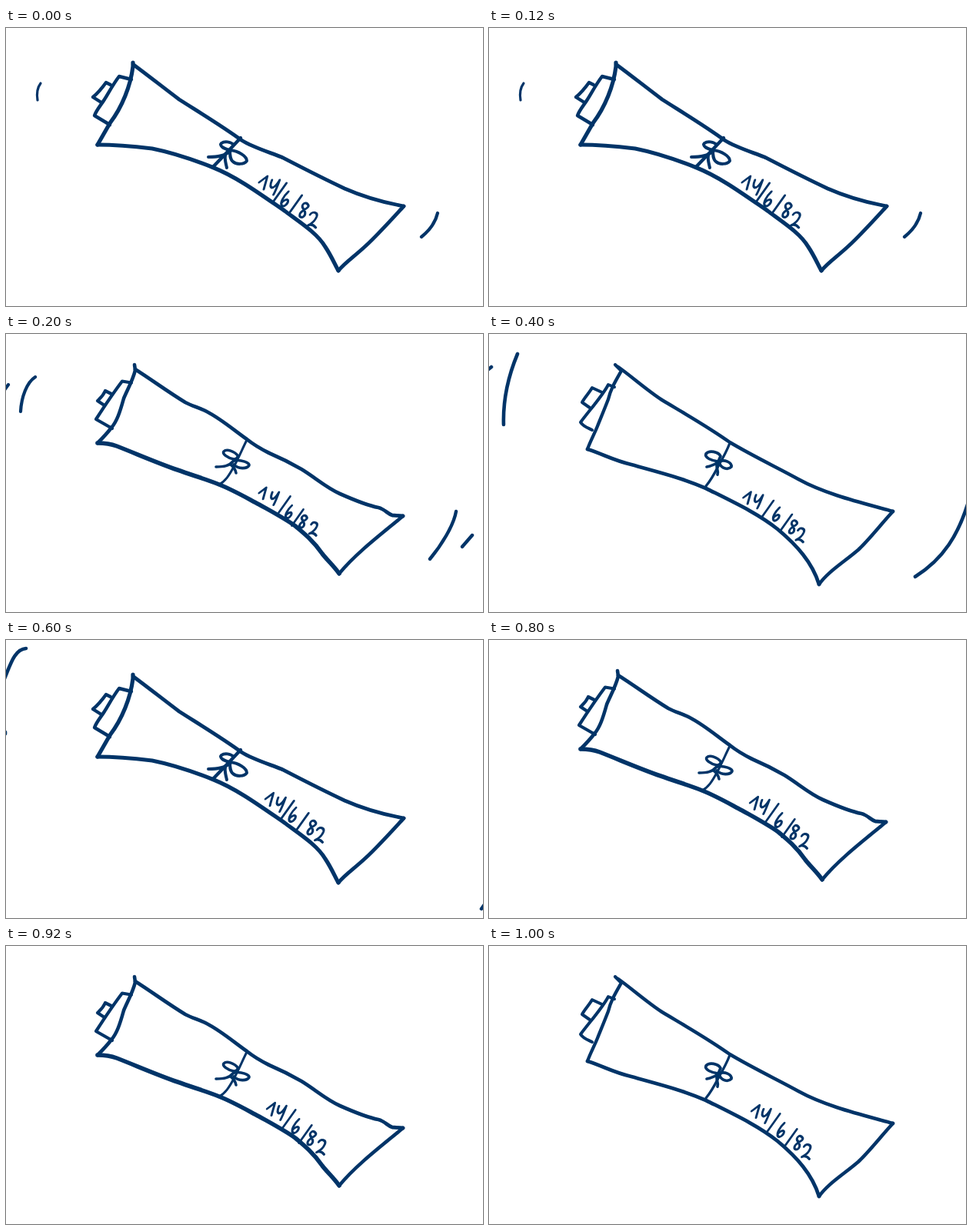
Recreate the animation shown at these times as an HTML page. Size 620 by 362 pixels, loop 1200 ms.

```html
<!DOCTYPE html>
<html lang="en">
<head>
<meta charset="utf-8">
<title>Tied scroll</title>
<style>
  html, body { margin: 0; width: 100%; height: 100%; overflow: hidden; background: #fff; }
  svg { display: block; width: 100vw; height: 100vh; }
  path { fill: none; stroke: #003468; stroke-linecap: round; stroke-linejoin: round; }
</style>
</head>
<body>
<svg id="stage" viewBox="0 0 620 362" role="img" aria-label="A tied scroll dated 14/6/82"></svg>
<script>
const HOLD = 200;
const stage = document.getElementById('stage');

// Three drawings of the scroll; each stroke is [width, path].
const scrolls = [
  [
    [5.2, 'M165 45L165 50C162 75 151 103 135 124L119 152'],
    [4.8, 'M166 48C185 62 205 78 225 93C250 109 280 127 306 146C320 155 340 161 358 168C385 182 410 195 440 209C465 220 495 228 517 232'],
    [4.8, 'M517 232C505 245 480 273 465 286C452 298 440 306 432 316'],
    [5.2, 'M119 152C140 152 165 154 190 157C220 163 245 172 270 182C300 194 330 216 362 238C385 255 405 268 415 285C423 297 427 307 432 316'],
    [4.4, 'M163 67L147 63C140 72 133 85 128 93C123 101 118 106 115 114L135 126'],
    [4.4, 'M136 74L130 71C125 78 119 85 113 90L124 97'],
    [4.4, 'M305 143L291 158L269 181'],
    [4, 'M291 159C282 157 277 153 280 150C284 147 292 148 296 152'],
    [4, 'M291 159C302 160 313 167 313 173C310 178 299 178 295 174C291 171 291 165 291 159'],
    [4, 'M290 161C284 167 275 168 263 168M285 166C284 172 286 177 287 182']
  ],
  [
    [4.6, 'M167 40L168 47C165 60 158 72 153 84C148 102 144 114 137 122C131 130 125 136 119 142'],
    [4.8, 'M168 46C190 60 210 75 233 89C242 94 252 96 261 101C280 111 296 125 313 137C323 145 332 150 342 155C356 161 370 168 384 176C402 187 416 200 434 208C452 216 468 223 484 226C492 228 496 234 502 236L516 237'],
    [4.6, 'M516 237C495 255 458 282 433 312'],
    [5.6, 'M119 142C127 142 136 143 144 146C172 157 197 168 223 177C242 184 260 189 277 196C295 203 312 213 329 222C345 231 362 240 376 250C388 260 400 270 411 286C417 294 427 303 433 312'],
    [4.2, 'M163 63.5L151 61.5C143 72 128 94 117 111L138 123'],
    [4.2, 'M137 78L129 74C126 81 122 84 119 87L128 93'],
    [3, 'M313 138C307 150 302 162 296 173C290 184 285 192 277 196'],
    [3.6, 'M296 163C287 161 281 156 283 153C287 149 297 153 301 158C302 161 299 163 296 163'],
    [3.6, 'M296 165C306 163 317 168 316 171C313 176 302 176 296 170'],
    [3.6, 'M296 165C290 172 283 173 273 173M292 170C296 173 298 176 299 181']
  ],
  [
    [4.3, 'M164 40L172 48C164 62 158 72 155 85C150 98 145 110 141 120C137 130 131 141 128 150'],
    [4.5, 'M168 43C185 55 205 73 225 86C255 104 285 121 313 141C345 160 375 174 402 189C440 210 490 221 525 231'],
    [4.5, 'M525 231C510 247 495 267 480 281C460 298 440 310 429 326'],
    [4.8, 'M128 150C150 157 160 164 185 170C220 180 250 187 282 201C320 220 350 234 375 254C400 275 420 297 429 326'],
    [4, 'M163 69L155 66C148 80 130 100 119 115C122 120 128 122 134 125'],
    [4, 'M147 76L134 70C130 77 124 83 121 89L131 96'],
    [3.3, 'M313 142C308 155 302 165 298 172C292 184 287 192 282 198'],
    [3.7, 'M298 166C289 165 280 161 282 156C286 151 298 153 301 159L298 166'],
    [3.7, 'M299 166C306 163 316 167 315 173C311 177 303 176 299 168'],
    [3.7, 'M298 167C293 170 289 172 283 173M297 168C294 174 299 178 297 183']
  ]
];

// Handwritten characters, centred on their own origin.
const glyphs = {
  '1': 'M-7 0L2 -8C2 -2 1 4 1 9',
  '4': 'M-5 -8C-6 -3 -6 1 -3 2C0 2 3 -3 5 -8C4 -1 3 5 1 11',
  '/': 'M6 -12L-6 12',
  '6': 'M2 -10C-3 -4 -6 4 -3 8C0 11 5 6 4 2C3 -1 -2 1 -4 5',
  '8': 'M4 -7C0 -12 -5 -7 -2 -3C2 1 5 6 1 9C-4 11 -6 5 -1 1C3 -2 7 -4 4 -7',
  '2': 'M-5 -6C-3 -11 5 -9 4 -3C3 2 -1 6 -5 8C-1 6 3 8 6 11'
};

// Each pose: character size, character centres, swing marks.
const poses = [
  { size: 1, date: '336,201 349,206 356,214 363,223 376,230 387,237 399,249',
    marks: [[3.2, 'M45 72C39 80 40 88 41 94'], [4.2, 'M561 241C558 254 550 264 540 272']] },
  { size: .86, date: '335,207 349,213 362,222 368,232 379,239 386,244 400,253',
    marks: [[4.2, 'M38 56C27 63 20 82 19 101M3 66L-2 73'], [4.4, 'M585 231C582 249 566 275 551 293M606 262L593 277']] },
  { size: .9, date: '337,213 350,217 362,228 374,235 386,246 395,251 405,261',
    marks: [[4.6, 'M37 26C25 55 18 85 19 118M3 43L-2 47'], [4.6, 'M622 222C610 260 592 292 554 316']] },
  { size: .96, date: '344,207 357,213 366,221 373,228 385,237 397,244 408,253',
    marks: [[4.6, 'M26 11C10 12 5 35 -4 55M-1 120L-1 122'], [4.6, 'M623 343L618 350']] },
  { size: .95, date: '346,212 358,216 368,225 377,235 389,245 397,250 410,261', marks: [] },
  { size: .95, date: '348,215 360,220 370,230 380,240 392,250 402,256 413,267', marks: [] }
];

const stroke = ([width, d]) => `<path stroke-width="${width}" d="${d}"/>`;

function writeDate({ size, date }) {
  return date.split(' ').map((at, i) =>
    `<g transform="translate(${at}) skewX(-12) scale(${size})">${stroke([3 / size, glyphs['14/6/82'[i]]])}</g>`
  ).join('');
}

let shown = -1;
function draw(time) {
  const index = Math.floor(time / HOLD) % poses.length;
  if (index !== shown) {
    shown = index;
    const pose = poses[index];
    const scroll = scrolls[index % scrolls.length];
    stage.innerHTML = [...scroll, ...pose.marks].map(stroke).join('') + writeDate(pose);
  }
}

const start = performance.now();
function tick() {
  draw(performance.now() - start);
  requestAnimationFrame(tick);
}
tick();
</script>
</body>
</html>
```
